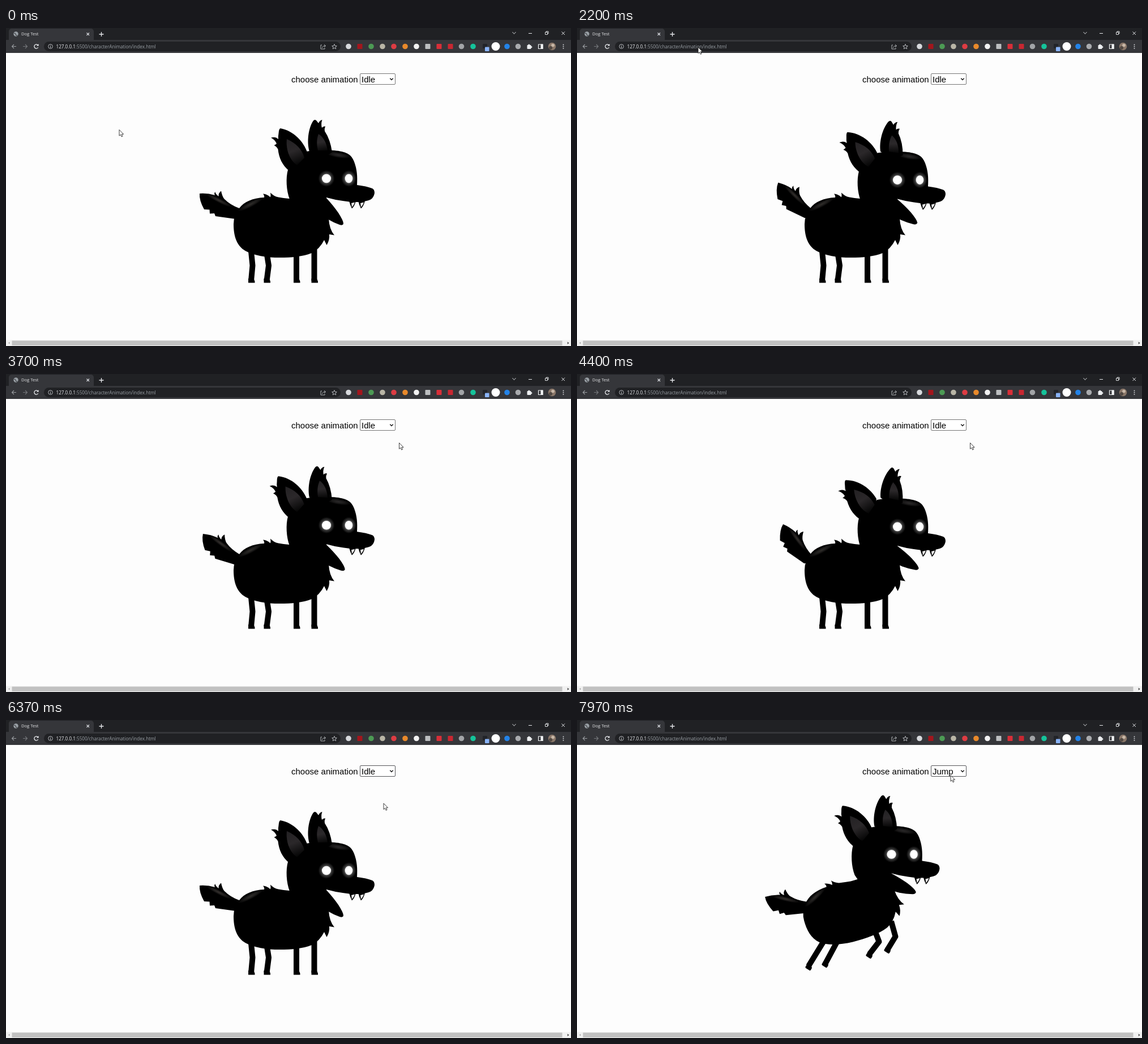
Recreate the animation shown at these times as an HTML page with a canvas. Size 998 by 561 pixels, loop 8 s.

```html
<!DOCTYPE html>
<html lang="en">
<head>
<meta charset="utf-8">
<title>Dog Test</title>
<style>
html, body { margin: 0; width: 100%; height: 100%; overflow: hidden; background: #fdfdfd; }
canvas { display: block; }
</style>
</head>
<body>
<canvas id="stage" width="998" height="561"></canvas>
<script>
const ctx = document.getElementById('stage').getContext('2d');
const LOOP = 8000, STEP = 1000 / 12, JUMP_AT = 6900;

const shapes = {
  body: 'M412 318C421 306 436 300 456 299Q457 296 454 292.500Q461 293 467 298.500Q468 295 467 290.500Q473 297 481 298.500Q490 300 500 301L566 300Q566 320 570 336Q571 355 580 365.500L571 364Q572 374 566.500 383L562 374Q554 390 540 397C522 404 500 405.500 475 405C452 404 430 399 418 390C405 379 402 362 402 346Q402 330 412 318Z',
  tail: 'M412 318Q396 312 386 302Q382 298 380 287.500Q375 291 375.500 297Q370 293 369.500 289Q367 292 369 295Q356 291 342 292Q341 304 350 320L359.500 320.500L360 327.500L368 327L370 332L406 337L418 330Z',
  head: 'M520 330L501 302C495 287 494 264 498 250L530 218Q552 214 580 216C600 218 610 222 615 236C620 249 621 262 620 277Q637 279 647 283Q651 285 651 291Q650 298 645 302C635 308 612 308 595 305Q580 303 566 299L560 325Z',
  jaw: 'M555 290L565 299Q578 313 587 326Q596 340 596 345Q595 349 589 347Q578 343 568 337L555 328Z',
  ear: 'M532 219C526 201 508 181 484.500 177Q482 178 481.500 186Q480.500 191 481 196Q476 191 468 193.500Q475 197 478 204Q476 206 473.500 207Q478 209 480.500 214C482 229 488 242 500 252L526 244Z',
  earIn: 'M496 196C494 212 500 233 514 242L527 229C523 214 512 203 496 196Z',
  ear2: 'M536 218C531 201 534 177 542.500 164Q545 160.500 548 163L552 168Q554 163 558.500 162Q556 169 558 176Q560 173 564 173.500Q562 178 563 182Q573 197 576 219L560 230Z',
  earIn2: 'M552 187C548 197 549 208 551 216L568 216C566 201 560 192 552 187Z',
  cursor: 'M0 0V10.700L2.400 8.500L4.100 12.300L6 11.500L4.300 7.800H7.600Z'
};
const art = {};
for (const name in shapes) art[name] = new Path2D(shapes[name]);

const idleLegs = ['433 394L435.500 419L433 446', '461 400L464 419L460.500 446', '513 400V446', '544.500 388V446'];
const jumpLegs = ['436 390L409 434', '460 390L438.500 430', '527 374L533.500 391L516.500 413', '555 355L562.500 382L548.500 405'];
const jumpFeet = [[409, 436], [438, 431], [516, 415], [548, 406]];

function fill(path, color = '#000') {
  ctx.fillStyle = color;
  ctx.fill(path);
}
function rect(x, y, w, h, color, r = 0) {
  ctx.beginPath();
  ctx.roundRect(x, y, w, h, r);
  ctx.fillStyle = color;
  ctx.fill();
}
function disc(x, y, rx, color, ry = rx) {
  ctx.beginPath();
  ctx.ellipse(x, y, rx, ry, 0, 0, 7);
  ctx.fillStyle = color;
  ctx.fill();
}
function line(d, color, width = 1) {
  ctx.strokeStyle = color;
  ctx.lineWidth = width;
  ctx.stroke(new Path2D(d));
}
function ring(x, y, r, color, width = 1) {
  ctx.beginPath();
  ctx.arc(x, y, r, 0, 7);
  ctx.strokeStyle = color;
  ctx.lineWidth = width;
  ctx.stroke();
}
function text(str, x, y, font, color) {
  ctx.font = font;
  ctx.fillStyle = color;
  ctx.fillText(str, x, y);
}
// Draws around pivot (x, y), turned by a and shifted by (dx, dy).
function part(x, y, a, dx, dy, draw) {
  ctx.save();
  ctx.translate(x + dx, y + dy);
  ctx.rotate(a);
  ctx.translate(-x, -y);
  draw();
  ctx.restore();
}
// Soft light that shows on black only.
function glow(x, y, rx, ry, turn, stops) {
  ctx.save();
  ctx.globalCompositeOperation = 'lighten';
  ctx.translate(x, y);
  ctx.rotate(turn);
  ctx.scale(rx, ry);
  const g = ctx.createRadialGradient(0, 0, 0, 0, 0, 1);
  stops.forEach((c, i) => g.addColorStop(i / (stops.length - 1), c));
  disc(0, 0, 1, g);
  ctx.restore();
}
function innerEar(path, x0, y0, x1, y1) {
  const g = ctx.createLinearGradient(x0, y0, x1, y1);
  g.addColorStop(0, '#242224');
  g.addColorStop(0.45, '#2b282a');
  g.addColorStop(1, '#050505');
  fill(path, g);
}

function drawFang(x) {
  fill(new Path2D(`M${x - 6} 305Q${x - 4} 313 ${x - 1} 318.500Q${x + 4} 314 ${x + 6} 305Z`));
  fill(new Path2D(`M${x - 2} 309L${x - 1} 316Q${x + 3} 312 ${x + 4} 307.500Z`), '#eee');
}

function drawHead(s, jaw, dx, dy) {
  part(0, 0, 0, dx, dy, () => {
    part(563, 300, jaw, 0, 0, () => fill(art.jaw));
    drawFang(612);
    drawFang(628);
    fill(art.head);
    glow(587, 224, 22, 5, 0.16, ['#2a2829', '#1a1919', '#000']);
    part(515, 235, -0.06 * s, 0, 0, () => {
      fill(art.ear);
      innerEar(art.earIn, 498, 198, 516, 241);
    });
    part(555, 217, 0.07 * s, 0, 0, () => {
      fill(art.ear2);
      innerEar(art.earIn2, 553, 188, 558, 218);
    });
    for (const [x, rx] of [[566, 8], [605.5, 6.7]]) {
      glow(x, 265.5, rx + 6.5, 14.5, 0, ['#fff', '#aaa', '#333', '#000']);
      disc(x, 265.5, rx, '#fff', 7.8);
    }
  });
}

function drawLegs(legs) {
  ctx.lineJoin = 'round';
  for (const leg of legs) line('M' + leg, '#000', 10);
  ctx.lineJoin = 'miter';
}

function drawTail(turn, dx, dy) {
  part(410, 325, turn, dx, dy, () => {
    fill(art.tail);
    glow(376, 304, 26, 4, 0.47, ['#35312e', '#1d1b1a', '#000']);
  });
}

function drawBody() {
  fill(art.body);
  glow(432, 311, 25, 5, -0.48, ['#302e2b', '#1b1a19', '#000']);
}

function drawIdle(s) {
  drawLegs(idleLegs);
  for (const x of [428, 455.500, 508, 539.500])
    fill(new Path2D(`M${x} 442H${x + 9}Q${x + 12} 446 ${x + 11.5} 449.500H${x}Z`));
  drawTail(0.155 * s, 0, 0);
  drawBody();
  drawHead(s, -0.06 * s, 0, 1.3 * s);
}

function drawJump(s) {
  const d = s - 2;
  part(0, 0, 0, 0, 1.2 * d, () => {
    drawLegs(jumpLegs);
    for (const [x, y] of jumpFeet)
      part(x, y, 0.58, 0, 0, () => rect(x - 5, y - 4, 11, 8, '#000', [2, 4, 2, 2]));
    drawTail(-0.24 + 0.05 * d, -4, 3);
    part(455, 293, -0.272, -17, -4, drawBody);
    drawHead(1.4 + 0.4 * d, -0.34 - 0.04 * d, -10.5, -28.5);
  });
}

function drawTabs() {
  rect(0, 0, 998, 22, '#202124');
  rect(5, 1, 150, 22, '#35363a', [5, 5, 0, 0]);
  rect(0, 21, 998, 23, '#35363a');
  disc(17.5, 10.5, 4.2, '#9aa0a6');
  line('M14 9.500Q17 8.500 17 11T20 13', '#35363a', 1.1);
  text('Dog Test', 27, 13.3, '7.6px "Open Sans", sans-serif', '#e3e4e6');
  line('M142.500 8.500L147 13M147 8.500L142.500 13', '#dfe1e5', 1.1);
  line('M168.500 7V15M164.500 11H172.500', '#e8eaed', 1.3);
  line('M894.500 7L897.500 10.500L900.500 7', '#d0d2d5');
  line('M923 9.500H929M981.500 6.500L987 12M987 6.500L981.500 12', '#e8eaed');
  line('M952.500 7.500H956.500V11.500H952.500ZM954 7.500V6H958V10H956.500', '#e8eaed', 0.9);
}

function drawToolbar() {
  const pale = '#dfe1e5';
  line('M18 32.500H10.500M14 29L10.500 32.500L14 36', '#9a9da1', 1.1);
  line('M30 32.500H37.500M34 29L37.500 32.500L34 36', '#75777b', 1.1);
  ctx.beginPath();
  ctx.arc(53.5, 32.5, 3.6, 0.5, 5.5);
  ctx.strokeStyle = '#e8eaed';
  ctx.lineWidth = 1.3;
  ctx.stroke();
  fill(new Path2D('M54 31.500H57.700V28Z'), '#e8eaed');
  rect(67, 24, 524, 17, '#202124', 8.5);
  ring(78.5, 32.5, 3.8, '#c4c7cb', 0.9);
  line('M78.500 32V35M78.500 30V31', '#c4c7cb');
  const font = '8.15px "Open Sans", sans-serif';
  text('127.0.0.1', 88.5, 35.7, font, '#e8eaed');
  text(':5500/characterAnimation/index.html', 88.5 + ctx.measureText('127.0.0.1').width, 35.7, font, '#9aa0a6');
  line('M558 30H556V37H563V35M558.500 35Q559 31.500 564 31.500M562 29L564.500 31.500L562 34', '#bfc2c6', 0.9);
  line('M580 28.500L581.200 31.500L584.300 31.700L581.900 33.700L582.700 36.800L580 35.100L577.300 36.800L578.100 33.700L575.700 31.700L578.800 31.500Z', '#c4c7cb', 0.9);

  const dots = [[605, '#d8dadd'], [645, '#4c9a54'], [665, '#b9b5a6'], [685, '#dd3c43'], [705, '#e8892b'],
    [725, '#f2f2f2'], [804.5, '#a2a4a7'], [825, '#15c39a'], [885, '#2383e8'], [904.5, '#a9abae']];
  for (const [x, c] of dots) disc(x, 32.5, 4.8, c);
  const squares = [[625, '#a3161d'], [745, '#bdbfc1'], [765, '#d92e38'], [785, '#c92731']];
  for (const [x, c] of squares) rect(x - 4.5, 28, 9, 9, c, 1);
  rect(842, 28, 8, 8, '#222429', 1);
  rect(846, 33.5, 7.5, 7.5, '#8ab4f8', 1);
  disc(865, 32.5, 7.5, '#fff');

  rect(920.5, 30, 7, 7, '#eceef0', 1);
  disc(923.8, 30, 1.6, '#eceef0');
  disc(927.8, 33.5, 1.6, '#eceef0');
  line('M940.500 29H948V36.500H940.500Z', '#f1f3f4', 1.2);
  rect(944.5, 28.5, 4, 8.5, '#f1f3f4');
  disc(964.5, 32.5, 6.8, '#8a7769');
  disc(966, 30.5, 2.8, '#c8b8a8');
  disc(962, 35, 3, '#514943');
  for (const y of [29.5, 32.7, 35.9]) disc(984.5, y, 0.9, pale);
}

function drawPage(mode, focused) {
  rect(0, 44, 998, 507, '#fdfdfd');
  const font = '15px "Liberation Sans", Arial, sans-serif';
  text('choose animation', 504, 95.7, font, '#000');
  rect(625.5, 80.5, 62, 19, '#fff', 1.5);
  ctx.strokeStyle = focused ? '#55565a' : '#767676';
  ctx.lineWidth = 1;
  ctx.stroke();
  text(mode, 628, 95.7, font, '#000');
  line('M678.300 88.700L681 91.500L683.700 88.700', '#111', 1.4);
  rect(0, 550.5, 998, 10.5, '#f1f1f1');
  rect(10.5, 551.5, 972, 8.5, '#c1c1c1');
  fill(new Path2D('M6.500 553.800V557.600L4 555.700Z'), '#a3a3a3');
  fill(new Path2D('M991.700 553.500V558L994.700 555.700Z'), '#505050');
}

// Time, x, y of the pointer.
const trail = [[560, 199.5, 179], [1150, 200, 29.5], [1700, 200, 29.5], [2150, 213.5, 33.5],
  [2500, 213.5, 33.5], [3550, 694, 121], [4640, 694, 121], [5050, 613, 236.5], [5150, 613, 236.5],
  [5700, 665, 92], [6050, 665, 92], [6340, 666.5, 146.500], [6450, 666.5, 146.500],
  [6750, 660, 122], [6950, 660, 122], [7300, 659.5, 97]];

function pointerAt(t) {
  const i = trail.findIndex(k => k[0] > t);
  if (i < 0) return trail[trail.length - 1].slice(1);
  if (i === 0) return trail[0].slice(1);
  const [a, b] = [trail[i - 1], trail[i]];
  const u = (t - a[0]) / (b[0] - a[0]), e = u * u * (3 - 2 * u);
  return [a[1] + (b[1] - a[1]) * e, a[2] + (b[2] - a[2]) * e];
}

function drawCursor(t) {
  const [x, y] = pointerAt(t);
  part(0, 0, 0, x + 0.5, y + 0.5, () => {
    fill(art.cursor, '#fff');
    ctx.strokeStyle = '#111';
    ctx.lineWidth = 0.8;
    ctx.stroke(art.cursor);
  });
}

function render(t) {
  const jumping = t >= JUMP_AT;
  const frame = t < 530 ? 0 : Math.floor(t / STEP - 0.42) % 7;
  const pose = Math.min(frame, 6 - frame);
  drawPage(jumping ? 'Jump' : 'Idle', t > 5750);
  drawTabs();
  drawToolbar();
  (jumping ? drawJump : drawIdle)(pose);
  drawCursor(t);
}

const start = performance.now();
function tick() {
  render((performance.now() - start) % LOOP);
  requestAnimationFrame(tick);
}
tick();
</script>
</body>
</html>
```
